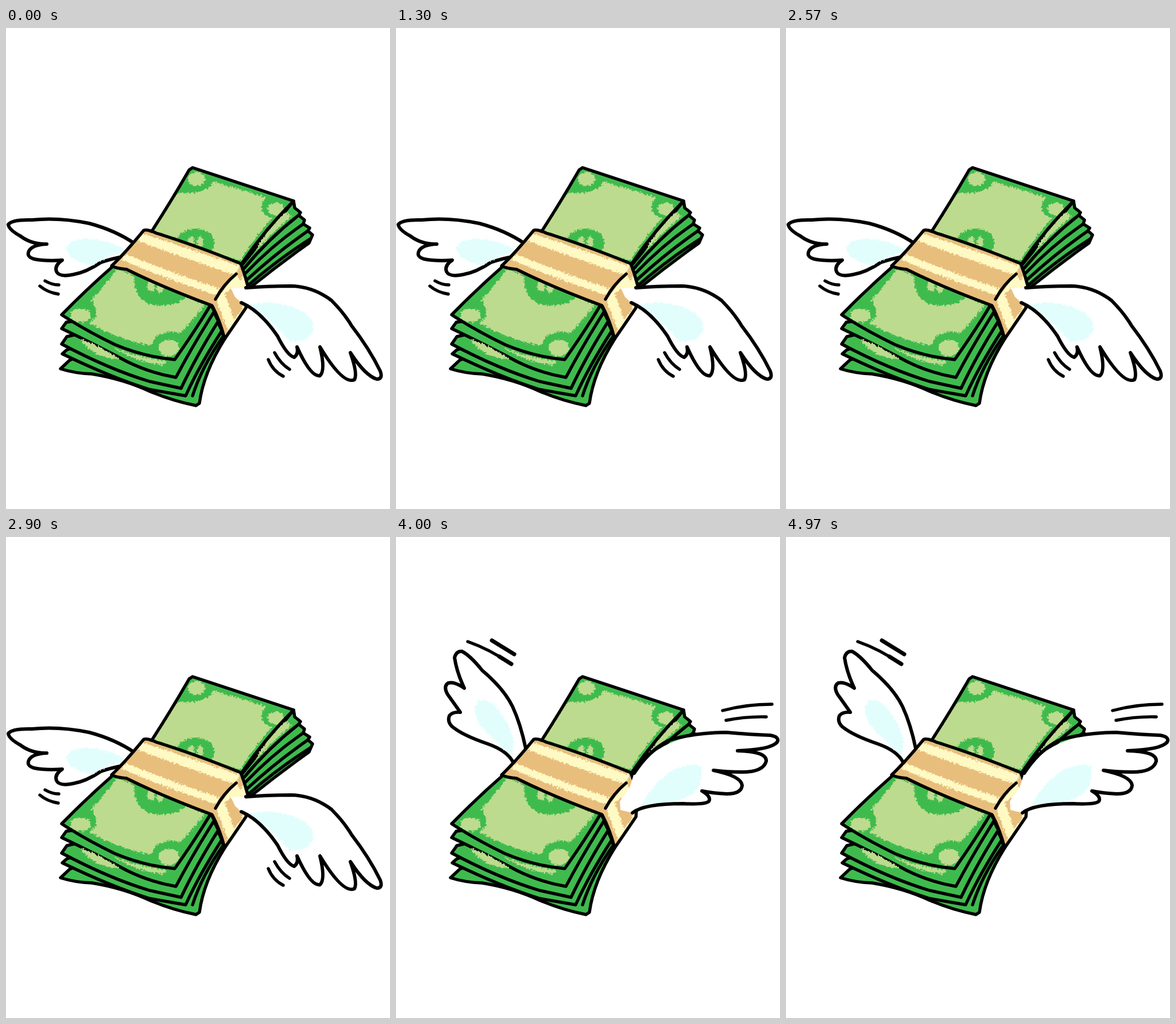
These frames come from a looping animation (669x837 px, 5.11 s). An HTML page:

```html
<!DOCTYPE html>
<html lang="en">
<head>
<meta charset="utf-8">
<title>Flying cash</title>
<style>
  html, body { margin: 0; width: 100%; height: 100%; overflow: hidden; background: #fff; }
  svg { display: block; width: 100%; height: 100%; }
  .ink { stroke: #000; stroke-width: 5.4; stroke-linecap: round; stroke-linejoin: round; fill: none; }
  .green { fill: #3fbb4e; }
  .light { fill: #bddb8e; }
  .tan { fill: #e8be7d; }
  .cream { fill: #fff9c3; }
  .white { fill: #fff; }
  .shade { fill: #e1fefd; }
  .wing { stroke-width: 6; }
  .bold { stroke-width: 7; }
</style>
</head>
<body>
<svg viewBox="0 0 669 837">
  <defs>
    <filter id="chalk" x="-10%" y="-10%" width="120%" height="120%" color-interpolation-filters="sRGB">
      <feTurbulence type="fractalNoise" baseFrequency=".3" numOctaves="2" seed="4"/>
      <feDisplacementMap in="SourceGraphic" scale="9" xChannelSelector="R" yChannelSelector="G"/>
    </filter>
    <clipPath id="bandClip"><path d="M240 352 L409 410 L401 428 L359 483 L184 414Z"/></clipPath>
    <clipPath id="faceClip"><path d="M409 410 L421 448 L418 487 L381 541 L359 483 L401 428Z"/></clipPath>
    <clipPath id="topClip"><path id="topBill" d="M325 243 L501 301 Q452 350 412 408 L357 481 Q332 523 294 577 Q240 572 190 551 Q138 526 97 499 Q140 455 187 414 L255 352 Q291 296 319 247Z"/></clipPath>
  </defs>

  <!-- left wing, behind the stack -->
  <g id="leftDown">
    <path class="ink wing white" d="M224 375 Q190 352 145 340 Q92 329 45 334 Q10 333 4 342 Q5 351 25 362 Q45 377 71 376 Q46 377 40 388 Q35 398 49 402 Q68 406 98 404 Q84 413 88 424 Q93 434 117 429 Q140 425 165 408 Q185 401 204 398"/>
    <path class="shade" filter="url(#chalk)" d="M105 382 Q112 365 148 367 Q184 372 205 384 L200 391 Q172 398 152 412 Q108 407 105 382Z"/>
    <path class="ink" d="M68 440 Q80 447 92 447 M59 449 Q72 460 91 463"/>
  </g>
  <g id="leftUp">
    <path class="ink wing white" d="M204 392 Q194 372 160 360 Q116 345 98 330 Q89 322 93 311 Q98 304 112 305 Q103 292 90 274 Q82 260 91 254 Q102 251 119 263 Q106 236 102 210 Q105 198 115 199 Q130 207 150 232 Q188 264 203 295 Q217 325 226 368"/>
    <path class="shade" filter="url(#chalk)" d="M137 298 Q140 278 160 285 Q190 304 205 352 L203 381 Q188 369 168 350 Q138 325 137 298Z"/>
    <path class="ink" d="M125 182 Q165 196 200 221"/>
    <path class="ink bold" d="M167 180 L206 204 M180 208 L201 221"/>
  </g>

  <!-- far end of the stack -->
  <path class="ink green" d="M501 301 L503 313 L513 321 L510 326 L520 334 L518 341 L529 348 L526 353 L534 360 L528 374 Q475 412 425 452 L405 420Z"/>
  <path class="light" filter="url(#chalk)" d="M488 320 L497 328 Q462 356 434 390 Q452 350 488 320Z"/>
  <path class="ink" d="M511 325 Q458 366 415 418 M518 341 Q465 377 418 426 M526 353 Q470 392 421 437 M530 367 Q475 402 424 446"/>

  <!-- near end, from bottom bill to second -->
  <g class="ink green">
    <path d="M111 578 L95 593 Q120 601 150 602 Q205 611 250 632 Q290 649 331 657 L337 653 Q344 600 381 541 L355 480Z"/>
    <path d="M106 560 L98 567 Q185 609 250 629 L313 640 Q337 587 376 527 L355 480Z"/>
    <path d="M106 537 L97 550 Q180 594 250 615 L305 627 Q331 572 370 510 L355 480Z"/>
    <path d="M105 512 L97 523 Q160 553 210 580 Q250 600 296 608 Q325 553 363 493 L355 478Z"/>
  </g>
  <path class="ink" d="M325 640 Q341 590 378 537"/>
  <g class="light" filter="url(#chalk)">
    <path d="M129 541 Q160 551 199 576 Q153 576 129 541Z"/>
    <path d="M186 556 Q235 575 279 579 L275 587 Q225 581 186 556Z"/>
  </g>

  <!-- top bill -->
  <use class="green" href="#topBill"/>
  <g clip-path="url(#topClip)">
    <g class="light" filter="url(#chalk)">
      <path d="M360 267 Q405 280 453 295 Q440 309 449 322 Q455 329 464 331 Q435 360 408 406 L255 352 Q278 318 298 286 Q322 290 338 284 Q358 279 360 267Z"/>
      <path d="M194 419 Q172 447 149 474 Q160 488 156 504 Q151 510 145 513 Q198 544 256 553 Q255 538 271 532 Q286 526 304 531 Q325 508 346 482Z"/>
      <ellipse cx="332" cy="263" rx="15" ry="12"/>
      <ellipse cx="470" cy="315" rx="14" ry="11"/>
      <ellipse cx="130" cy="500" rx="18" ry="12"/>
      <ellipse cx="284" cy="557" rx="18" ry="14"/>
    </g>
    <g class="green" filter="url(#chalk)">
      <ellipse cx="330" cy="374" rx="33" ry="25"/>
      <path d="M223 425 Q221 481 266 483 Q308 483 316 462Z"/>
    </g>
    <g class="light" filter="url(#chalk)">
      <ellipse cx="322" cy="371" rx="6" ry="8"/>
      <ellipse cx="338" cy="372" rx="6" ry="9"/>
      <ellipse cx="253" cy="449" rx="6" ry="10"/>
      <ellipse cx="268" cy="453" rx="6" ry="8"/>
    </g>
  </g>
  <use class="ink" href="#topBill"/>

  <!-- paper band -->
  <path class="tan" d="M240 352 L409 410 L401 428 L359 483 L184 414Z"/>
  <g clip-path="url(#bandClip)">
    <path class="cream" filter="url(#chalk)" d="M237 357 Q315 383 410 415 L399 430 Q315 402 228 370Z"/>
    <path class="cream" filter="url(#chalk)" d="M209 394 Q285 424 373 454 L366 465 Q280 437 201 403Z"/>
  </g>
  <path class="cream" d="M409 410 L421 448 L418 487 L381 541 L359 483 L401 428Z"/>
  <g class="tan" clip-path="url(#faceClip)">
    <g filter="url(#chalk)">
      <path d="M359 481 L366 474 L388 530 L381 543Z"/>
      <path d="M381 463 L391 453 L410 478 L413 490 L397 506Z"/>
      <path d="M407 412 L415 430 L408 440 L402 428Z"/>
    </g>
  </g>
  <path class="ink" d="M240 352 Q248 350 262 357 Q330 378 409 410 Q416 428 421 448 L418 487 L381 541 Q372 507 359 483 Q270 450 210 420 Q191 418 184 414 Q209 390 240 352Z M401 428 Q378 447 365 472"/>

  <!-- right wing, in front -->
  <g id="rightDown">
    <path class="white" d="M418 452 L392 453 L399 468 L410 478 Q442 494 470 530 Q487 563 502 573 L507 555 L545 606 L547 555 L605 612 L600 565 L650 608 Q610 535 600 515 Q570 470 530 453 Q490 447 418 452Z"/>
    <path class="shade" filter="url(#chalk)" d="M420 482 Q472 471 510 490 Q540 505 535 525 Q525 549 494 545 Q470 518 440 494Z"/>
    <path class="ink wing" d="M418 452 Q455 449 497 449 Q535 450 567 474 Q589 496 602 518 Q633 558 652 597 Q657 611 646 611 Q626 605 600 565 Q613 602 607 612 Q587 621 547 555 Q557 596 547 605 Q531 608 507 555 Q510 567 502 573 Q490 570 473 536 Q443 492 410 478"/>
    <path class="ink" d="M468 565 Q478 584 494 594 M457 577 Q465 597 483 606"/>
  </g>
  <g id="rightUp">
    <path class="white" d="M415 411 L407 436 L390 460 L391 475 L412 480 Q435 468 500 464 L545 460 L533 442 L600 440 L553 406 L640 400 L595 372 L664 355 L655 345 L575 340 Q460 342 415 411Z"/>
    <path class="shade" filter="url(#chalk)" d="M427 467 Q447 428 482 406 Q520 389 531 400 Q535 428 520 445 Q500 463 427 467Z"/>
    <path class="ink wing" d="M415 411 Q440 372 475 354 Q515 341 575 340 Q620 344 652 345 Q669 348 664 357 Q653 370 595 372 Q646 373 645 390 Q640 409 603 409 Q575 409 553 406 Q601 416 603 432 Q602 447 576 447 Q553 446 533 442 Q550 452 545 460 Q538 466 500 464 Q432 464 412 480"/>
    <path class="ink" d="M569 302 Q610 291 655 291 M575 319 Q610 312 645 313"/>
  </g>
</svg>
<script>
  const LOOP = 5110;
  // The wings flip between two poses at each of these times.
  const flips = [170, 330, 490, 650, 800, 970, 1130, 1300, 1460, 1620, 1770, 1940, 2100, 2270, 2400,
    2570, 2730, 2890, 3050, 3210, 3370, 3530, 3690, 3850, 4000, 4170, 4330, 4500, 4670, 4840, 4970];
  const byId = id => document.getElementById(id);
  const down = [byId("leftDown"), byId("rightDown")];
  const up = [byId("leftUp"), byId("rightUp")];
  const show = (parts, on) => parts.forEach(p => p.setAttribute("visibility", on ? "visible" : "hidden"));

  function draw(ms) {
    const t = ms % LOOP;
    const raised = flips.filter(f => f <= t).length % 2 === 1;
    show(up, raised);
    show(down, !raised);
  }

  const start = performance.now();
  function tick() {
    draw(performance.now() - start);
    requestAnimationFrame(tick);
  }
  tick();
</script>
</body>
</html>
```
